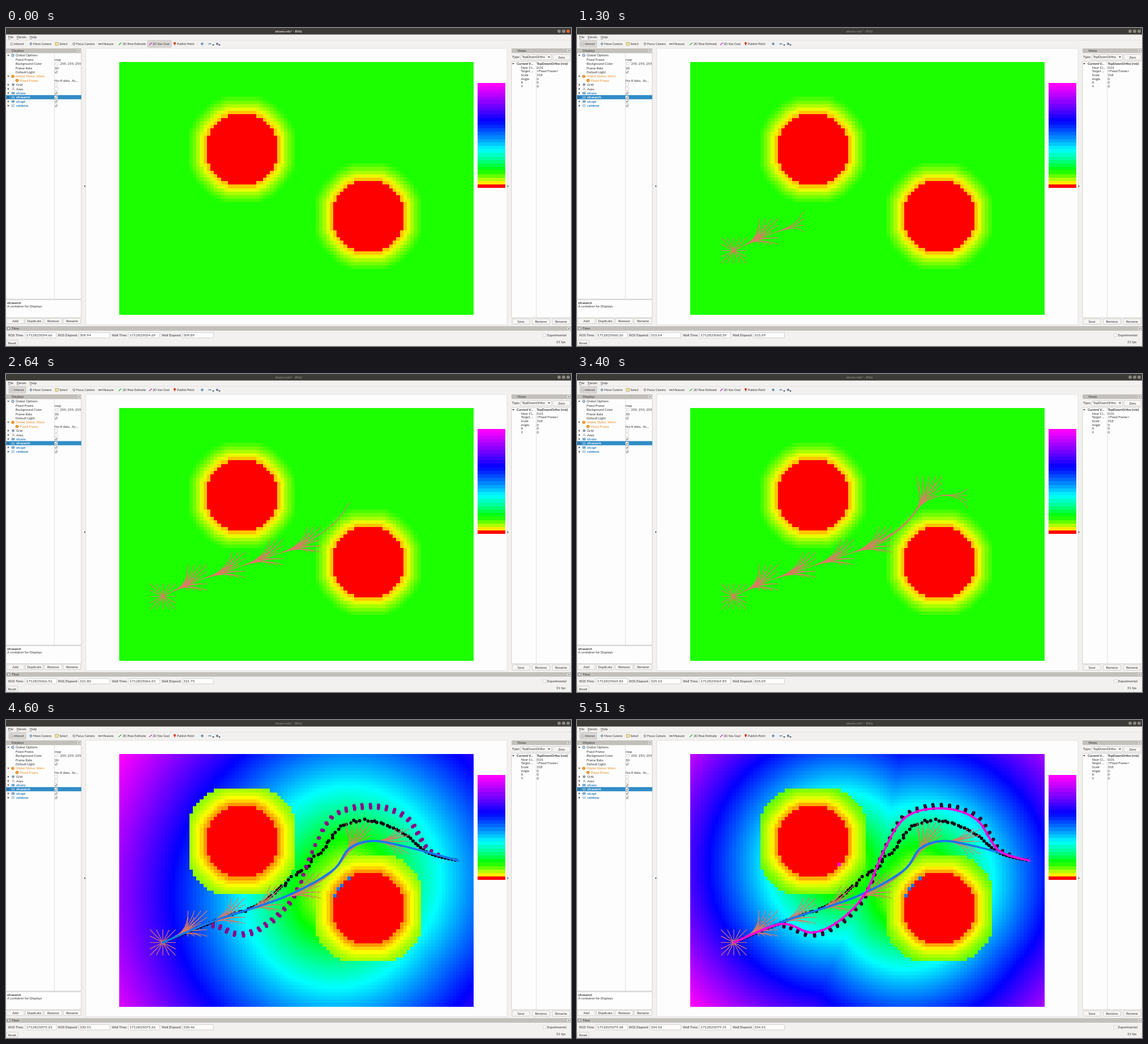
Write an HTML page with a canvas that moves like this. It is 998x561 px and loops after 5550 ms.

```html
<!DOCTYPE html>
<html lang="en">
<head>
<meta charset="utf-8">
<title>RViz path planning</title>
<style>
html, body { margin: 0; width: 100%; height: 100%; overflow: hidden; background: #f2f1f0; }
canvas, svg { position: absolute; left: 0; top: 0; width: 998px; height: 561px; }
text { font-family: Lato, "Open Sans", sans-serif; font-size: 5.9px; fill: #333; white-space: pre; }
.tool { font-size: 5.3px; }
.num { font-size: 6.4px; }
.bold { font-weight: 700; }
.mid { text-anchor: middle; }
</style>
</head>
<body>
<svg id="ui" viewBox="0 0 998 561"></svg>
<canvas id="map" width="998" height="561"></canvas>
<script>
const LOOP = 5550, STEP = LOOP / 166;
const ctx = document.getElementById('map').getContext('2d');

// ---------- window ----------
let out = '';
const rect = (x, y, w, h, fill, extra = '') =>
  out += `<rect x="${x}" y="${y}" width="${w}" height="${h}" fill="${fill}" ${extra}/>`;
const text = (x, y, s, cls = '', extra = '') => out += `<text x="${x}" y="${y}" class="${cls}" ${extra}>${s}</text>`;
const path = (d, stroke, w = 1, fill = 'none') =>
  out += `<path d="${d}" stroke="${stroke}" stroke-width="${w}" fill="${fill}"/>`;
const dot = (x, y, r, fill, extra = '') => out += `<circle cx="${x}" cy="${y}" r="${r}" fill="${fill}" ${extra}/>`;
const frame = (x, y, w, h, fill = '#fdfdfd') =>
  rect(x, y, w, h, fill, 'stroke="#c4c0bb" stroke-width=".7" rx="1"');
const button = (x, y, w, s) => {
  frame(x, y, w, 9.6, '#f6f5f4');
  text(x + w / 2, y + 7, s, 'mid');
};
const tri = (x, y, down) => path(down ? `M${x - 2} ${y - 1}h4l-2 2.4z` : `M${x - 1} ${y - 2}v4l2.4-2z`, 'none', 0, '#444');
const check = (x, y, on) => {
  frame(x - 2.7, y - 2.7, 5.4, 5.4);
  if (on) path(`M${x - 1.6} ${y}l1.3 1.5 2-3.2`, '#444', .9);
};
const header = (x, y, w, s) => {
  rect(x, y, w, 8, '#c3c0bc');
  text(x + 10, y + 6.2, s);
  frame(x + w - 7, y + 1.3, 5.6, 5.4, '#eee');
  path(`M${x + w - 5.4} ${y + 2.8}l2.4 2.4m0-2.4l-2.4 2.4`, '#444', .7);
};

rect(0, 0, 998, 561, '#f2f1f0');
rect(0, 0, 998, 11.5, '#3c3b37');
text(499, 8, 'sfcenv.rviz* - RViz', 'mid bold', 'id="title"');
for (let i = 0; i < 3; i++) dot(977 + i * 8, 5.7, 2.9, '#8a8780', `id="win${i}"`);
[[4, 'File'], [19, 'Panels'], [42, 'Help']].forEach(([x, s]) => {
  text(x, 18, s);
  path(`M${x} 19.3h3.5`, '#444', .6);
});
path('M0 21.5H998', '#e2dfdc', .8);
rect(5, 22.3, 30, 11.6, '#dcd9d6', 'id="tool" rx="1.5" stroke="#bbb7b2" stroke-width=".7"');
[[14, 'Interact'], [48, 'Move Camera'], [94.5, 'Select'], [124, 'Focus Camera'], [170, 'Measure'],
 [206, '2D Pose Estimate'], [259, '2D Nav Goal'], [302, 'Publish Point']]
  .forEach(([x, s]) => text(x, 30, s, 'tool'));
path('M8 30v-3l2-2 2 3v2z', '#999', .7, '#ddd');
path('M41 28h6M44 25v6', '#557799', 1.1);
rect(87, 25.3, 5.5, 5, '#f4e69a', 'stroke="#9a8c3c" stroke-width=".6"');
path('M117 28h6M120 25v6', '#888');
dot(120, 28, 1.7, '#eee', 'stroke="#666" stroke-width=".6"');
rect(163, 27, 6, 2.4, '#8d8d8d');
path('M199 30l4.6-4', '#22b93c', 1.3);
path('M253 30l4.6-4', '#c22bb8', 1.3);
path('M298 31l-2-3.6a2.1 2.1 0 1 1 4 0z', 'none', 0, '#d3442d');
path('M344 28h5M346.5 25.5v5M357.5 28h5', '#4d7fae', 1.5);
dot(373, 28, 2, '#55789a');
tri(366, 30, true); tri(377, 30, true);

// displays panel
header(0, 36, 133, 'Displays');
frame(0, 44, 133, 434);
path('M85.5 44V478', '#d5d2cf', .7);
rect(0, 118.4, 133, 7.3, '#308cc6');
const rowY = i => 48.2 + i * 7.4;
const ink = '#333', blue = '#2079b5', orange = '#e58b20';
[['Global Options', 17, ink], ['Fixed Frame', 17, ink, 'map'], ['Background Color', 17, ink, '    255; 255; 255'],
 ['Frame Rate', 17, ink, '30'], ['Default Light', 17, ink, 1], ['Global Status: Warn', 17, orange],
 ['Fixed Frame', 25, orange, 'No tf data.  Ac…'], ['Grid', 18, ink, 0], ['Axes', 18, ink, 0],
 ['sfcenv', 18, blue, 1], ['sfcsearch', 18, '#fff', 1], ['sfcopt', 18, blue, 1], ['rainbow', 18, blue, 1]]
  .forEach(([s, x, fill, val], i) => {
    const y = rowY(i);
    text(x, y + 2.2, s, i > 8 ? 'bold' : '', `style="fill:${fill}"`);
    if (typeof val === 'string') text(val.startsWith(' ') ? 89.5 : 86, y + 2.2, val);
    if (typeof val === 'number') check(88.5, y, val);
    if (i === 0 || i === 5) tri(4, y, true);
    if (i > 6) tri(4, y, false);
  });
frame(87.5, 60.6, 4.5, 4.8);
dot(12, rowY(0), 2.6, '#7b9cba'); dot(12, rowY(0), 1, '#fff');
[[12, 5], [19.5, 6]].forEach(([x, i]) => {
  dot(x, rowY(i), 2.8, orange);
  text(x, rowY(i) + 2, '!', 'mid', 'style="fill:#fff"');
});
dot(12.5, rowY(7), 2.4, '#8a98a8');
path('M10.5 109.5l2-2v-2.8M12.5 107.5l3 2', '#777', .9);
[9, 10, 11].forEach(i => rect(9.6, rowY(i) - 2, 5.8, 4.2, '#78a9d0', 'rx=".6"'));
path('M9.5 135.5h6M9.5 137h5M9.5 138.6h6', '#78a9d0', .8);
frame(0, 479.5, 133, 31.5);
text(2, 486.6, 'sfcsearch', 'bold');
text(2, 493.2, 'A container for Displays');
['Add', 'Duplicate', 'Remove', 'Rename'].forEach((s, i) => button(1 + i * 33.4, 512, 31, s));

// render area and views panel
rect(141, 36, 744, 487.5, '#fdfdfd', 'stroke="#d5d2cf" stroke-width=".6"');
path('M140 277.3v3.4l-2.2-1.7zM885.7 277.3v3.4l2.2-1.7z', 'none', 0, '#444');
header(893, 36, 105, 'Views');
text(894, 53.4, 'Type:');
frame(909, 46.7, 54.5, 9.6, '#f6f5f4');
text(911.5, 53.4, 'TopDownOrtho');
tri(959, 51.3, true);
button(966, 46.7, 31, 'Zero');
frame(893, 59, 105, 452);
path('M936.5 59V511', '#d5d2cf', .7);
tri(896, 63, true);
[['Current V…', 'TopDownOrtho (rviz)'], ['Near Cl…', '0.01'], ['Target …', '&lt;Fixed Frame&gt;'],
 ['Scale', '318'], ['Angle', '0'], ['X', '0'], ['Y', '0']].forEach(([k, v], i) => {
  const y = 65.2 + i * 6.6, cls = i ? '' : 'bold';
  text(i ? 909.5 : 902, y, k, cls);
  text(937.5, y, v, cls);
});
['Save', 'Remove', 'Rename'].forEach((s, i) => button(894 + i * 35.5, 513, 31, s));

// time panel
header(0, 526, 998, 'Time');
dot(4.5, 530, 2.4, '#eee', 'stroke="#555" stroke-width=".7"');
[[4, 'ROS Time:', 34], [92, 'ROS Elapsed:', 128.5], [187, 'Wall Time:', 216.5], [275, 'Wall Elapsed:', 311.5]]
  .forEach(([x, s, fx], i) => {
    text(x, 544.2, s);
    frame(fx, 537.3, 55, 9.4);
    text(fx + 1.7, 544.3, '', 'num', `id="num${i}"`);
  });
check(951.2, 542, false);
text(956, 544.2, 'Experimental');
button(1, 550.7, 20, 'Reset');
text(972, 556.4, '31 fps');

const el = id => document.getElementById(id);
el('ui').innerHTML = out;

// ---------- cost map ----------
const CELL = 6.195, X0 = 200, Y0 = 59.5, COLS = 101, ROWS = 72, REACH = 5;
const discs = [[35, 25], [71, 44]];
const isRed = (c, r) => discs.some(([x, y]) => (c + .5 - x) ** 2 + (r + .5 - y) ** 2 < 103);
const rainbow = v => `hsl(${300 * Math.sqrt(Math.min(1, v))} 100% 50%)`;
const cells = Array.from({ length: COLS * ROWS }, (_, k) => [k % COLS, Math.floor(k / COLS)]);

// Distance to the nearest obstacle cell, Infinity outside the inflated octagon.
const clearance = cells.map(([c, r]) => {
  let best = Infinity;
  for (let i = -REACH; i <= REACH; i++)
    for (let j = -REACH; j <= REACH; j++)
      if (Math.abs(i) + Math.abs(j) < 2 * REACH && isRed(c + i, r + j)) best = Math.min(best, Math.hypot(i, j));
  return best;
});

function block(g, x0, y0, c, r, w, fill) {
  const x = Math.round(x0 + c * CELL), y = Math.round(y0 + r * CELL);
  g.fillStyle = fill;
  g.fillRect(x, y, Math.round(x0 + (c + w) * CELL) - x, Math.round(y0 + (r + 1) * CELL) - y);
}

function costMap(seeds) {
  const cv = document.createElement('canvas');
  cv.width = 998; cv.height = 561;
  const g = cv.getContext('2d');
  const far = cells.map(([c, r]) => seeds.length
    ? Math.min(...seeds.map(([x, y]) => Math.hypot(c - x, r - y))) : REACH + 1);
  const top = seeds.length ? Math.max(...far) : 42;
  cells.forEach(([c, r], k) => {
    const d = clearance[k] < Infinity ? Math.min(clearance[k], REACH + 1) : far[k];
    block(g, X0, Y0, c, r, 1, rainbow(d / top));
  });
  seeds.forEach(([c, r, fill]) => block(g, X0, Y0, c, r, 1, fill));
  for (let r = 0; r < 30; r++) block(g, 832.5, 96.5, 0, r, 8, rainbow((29 - r) / 29));
  return cv;
}
const BLUE = '#1478f0', PINK = '#ff00d8', TREE = '#d87c64';
const near = [[61, 40, BLUE], [62, 38, BLUE], [63, 37, BLUE], [65, 35, BLUE]];
const maps = [[], near, [...near, [42, 31, PINK]]].map(costMap);

// ---------- search tree: constant-acceleration arcs ----------
const U = 11.15;
const edges = [];
function fan(x, y, vx, vy, iMin, iMax, keep = () => true) {
  for (let i = iMin; i <= iMax; i++)
    for (let j = 2; j >= -2; j--)
      if (keep(i, j)) edges.push(new Path2D(
        `M${x} ${y}Q${x + vx * U / 2} ${y + vy * U / 2} ${x + (vx + i) * U} ${y + (vy + j) * U}`));
}
const ROOT = [277, 392.5];
fan(...ROOT, 0, 0, -2, 2, (i, j) => Math.max(Math.abs(i), Math.abs(j)) === 2);
const starSize = edges.length;
for (let k = 0, x = ROOT[0] + 2 * U, y = ROOT[1] - U; k < 4; k++, y -= 2 * U) {
  fan(x, y, k ? 6 : 4, -2, -2, k ? 0 : 1);
  x += (k ? 6 : 5) * U;
}
for (let s = 0; s < 3; s++) edges.push(new Path2D(`M${533 + s} ${295 + s}Q${585 + s} 270 ${606 + s / 2} 227`));
fan(600.3, 240, 2, -3.3, -2, 2, (i, j) => j < 2 && (i > 0 || j < 0));
fan(645, 214, 6, 0, -2, 0);

// ---------- trajectories ----------
// Smooth curve through a few key points.
function curve(points) {
  const at = i => points[Math.max(0, Math.min(points.length - 1, i))];
  let d = 'M' + points[0];
  for (let i = 0; i < points.length - 1; i++) {
    const [a, b, c, e] = [at(i - 1), at(i), at(i + 1), at(i + 2)];
    d += 'C' + [0, 1].map(k => b[k] + (c[k] - a[k]) / 6) + ' ' + [0, 1].map(k => c[k] - (e[k] - b[k]) / 6) + ' ' + c;
  }
  const p = document.createElementNS('http://www.w3.org/2000/svg', 'path');
  p.setAttribute('d', d);
  return { shape: new Path2D(d), size: p.getTotalLength(), at: s => p.getPointAtLength(s) };
}
const GOAL = [799, 248];
const first = curve([ROOT, [371, 353], [490, 313], [575, 267], [606, 227], [645, 213.5], [700, 222], GOAL]);
const early = curve([ROOT, [380, 350], [440, 329], [487, 294], [555, 235], [590, 190], [640, 177], [700, 199], [745, 234], GOAL]);
const best = curve([ROOT, [360, 360], [415, 375], [465, 353], [510, 305], [540, 235], [580, 172], [645, 156], [705, 175], [745, 230], GOAL]);

let seed = 7;
const rand = () => (seed = (seed * 16807) % 2147483647) / 2147483647 - .5;

// Points along a curve, pushed sideways by an S-shaped offset plus jitter.
function scatter(line, gap, from, to, swing, jitter) {
  const res = [];
  for (let s = from * line.size; s < to * line.size; s += gap) {
    const p = line.at(s), q = line.at(s + 1), f = s / line.size;
    const side = -swing * Math.sin(2 * Math.PI * f), k = jitter * Math.sin(Math.PI * f) ** 2;
    res.push([p.x - (q.y - p.y) * side + rand() * k, p.y + (q.x - p.x) * side + rand() * k]);
  }
  return res;
}
const dark = scatter(early, 6, 0, 1, 0, 6);
const layers = [-1, -4, -7].map(swing => scatter(best, 14, .14, .95, swing, 2));

function dots(list, fill) {
  ctx.fillStyle = fill;
  ctx.beginPath();
  for (const [x, y] of list) {
    ctx.moveTo(x + 3, y);
    ctx.arc(x, y, 3, 0, 7);
  }
  ctx.fill();
}
function line(shape, color, w) {
  ctx.strokeStyle = color;
  ctx.lineWidth = w;
  ctx.stroke(shape);
}

// ---------- timeline ----------
const CLICK = 300, STAR = 380, GROW = 670, PLAN = 3760, DARK = 4180, VIOLET = 4360, FINAL = 5030;
const SPEED = 4.49 / 1000;
const ramp = (t, a, b) => Math.min(1, Math.max(0, (t - a) / (b - a)));

function draw(now) {
  const t = Math.floor((now % LOOP) / STEP + .02) * STEP;
  const run = t * SPEED, stamp = 1712825054.66 + run, elapsed = 309.94 + run;
  [stamp, elapsed, stamp + .03, elapsed - .05].forEach((v, i) => el('num' + i).textContent = v.toFixed(2));

  const navTool = t < CLICK;
  el('tool').setAttribute('x', navTool ? 250 : 5);
  el('tool').setAttribute('width', navTool ? 42 : 30);
  el('title').style.fill = navTool ? '#dfdbd2' : '#85827b';
  el('win2').setAttribute('fill', navTool ? '#e9602f' : '#8a8780');

  ctx.clearRect(0, 0, 998, 561);
  ctx.drawImage(maps[(t >= PLAN) + (t >= FINAL)], 0, 0);
  ctx.lineCap = ctx.lineJoin = 'round';
  if (t >= DARK) dots(dark, '#160014');
  layers.forEach((l, i) => {
    if (t >= VIOLET + i * 60) dots(l, t < FINAL ? '#8c0086' : i < 1 ? '#64005a' : '#3a0034');
  });

  // The search slows down as it nears the obstacles.
  const grown = ramp(t, GROW, PLAN) ** .85 * (edges.length - starSize);
  const count = Math.floor(ramp(t, STAR, GROW - 30) * starSize + grown);
  edges.slice(0, count).forEach(e => line(e, TREE, 1.2));
  if (t >= PLAN) line(first.shape, BLUE, 3.8);
  if (t >= FINAL) line(best.shape, PINK, 3.8);
}

const start = performance.now();
function tick() {
  draw(performance.now() - start);
  requestAnimationFrame(tick);
}
tick();
</script>
</body>
</html>
```
